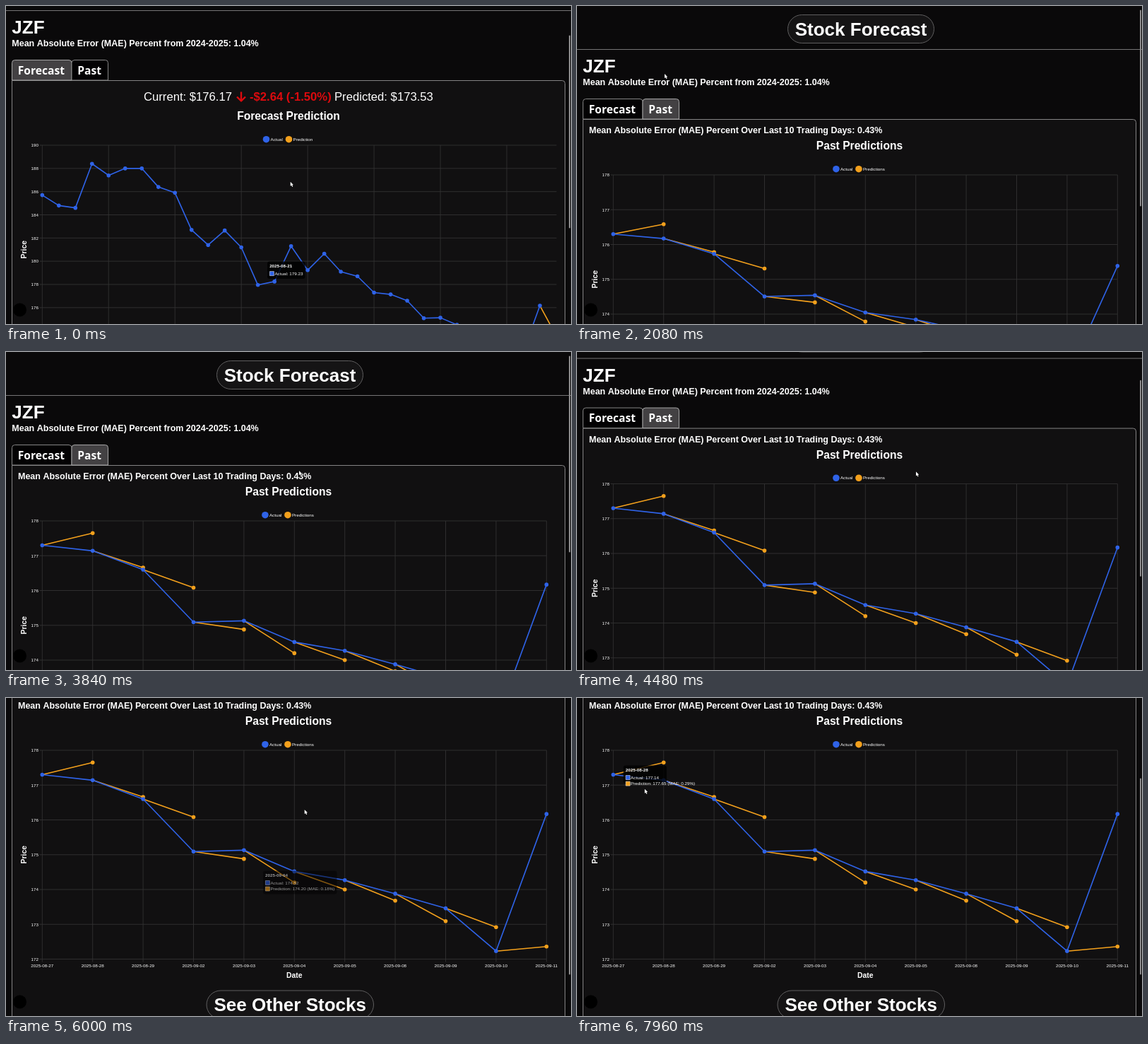
Animation of 800x450 px, one loop 8 s. Source, as an HTML page with a canvas:

```html
<!DOCTYPE html>
<html lang="en">
<head>
<meta charset="utf-8">
<title>Stock Forecast</title>
<style>
  html, body { margin: 0; width: 100%; height: 100%; overflow: hidden; background: #0a090a; }
  canvas { display: block; }
</style>
</head>
<body>
<canvas id="stage" width="800" height="450"></canvas>
<script>
const ctx = document.getElementById('stage').getContext('2d');
const LOOP = 8000, SWITCH = 1740;
const SCALE = 800 / 1536; // page pixels to stage pixels
const TINY = 12 * SCALE, HEADING = 24 * SCALE, TITLE = 30 * SCALE, LARGE = 32 * SCALE, HUGE = 50 * SCALE;
const LEFT = 51.3, PLOT = 295.5, FLOOR = 172; // plot edge, plot height, lowest price
const BLUE = '#2f63e8', ORANGE = '#f3a01c', RED = '#dc0a0e', WHITE = '#fff', RULE = '#333233';
const SANS = '"Liberation Sans", Arial, sans-serif', TAB_FONT = '"Noto Sans", sans-serif';

const prices = [185.7, 184.8, 184.6, 188.4, 187.4, 188, 188, 186.4, 185.9, 182.7, 181.4, 182.65, 181.2, 177.95,
  178.25, 181.3, 179.23, 180.65, 179.1, 178.7, 177.3, 177.14, 176.6, 175.09, 175.13, 174.52, 174.27, 173.88,
  173.46, 172.23, 176.17];
const guesses = [177.65, 176.66, 176.08, 174.88, 174.2, 174, 173.68, 173.09, 172.92, 172.36, 173.53];
const guessAt = i => guesses[i - 21];
const days = tradingDays(32);

const forecast = { title: 'Forecast Prediction', guessName: 'Prediction', top: 252, max: 190, step: 2,
  first: 0, last: 31, guessFrom: 31, dx: 23.49, gridEvery: 4 };
const past = { title: 'Past Predictions', guessName: 'Predictions', top: 239, max: 178, step: 1,
  first: 20, last: 30, guessFrom: 21, dx: 71.4, gridEvery: 1 };

// time, x, y of the pointer tip
const path = [[0, 403, 249], [920, 124, 96], [3240, 124, 96], [3840, 415, 168], [4240, 415, 168],
  [4600, 512, 170], [5880, 512, 170], [5960, 500, 168], [6000, 423, 158], [6880, 139, 131.5],
  [7300, 58, 128], [7880, 58, 128], [LOOP, 114, 129]];

const clamp = v => Math.max(0, Math.min(1, v));
const mix = (a, b, k) => a + (b - a) * k;
const outQuart = v => 1 - (1 - clamp(v)) ** 4;
const smooth = v => (v = clamp(v), v * v * (3 - 2 * v));
const chartX = (c, i) => LEFT + c.dx * (i - c.first);
const chartY = (c, v) => c.top + PLOT * (c.max - v) / (c.max - FLOOR);

function tradingDays(count) {
  const list = [];
  for (const d = new Date(Date.UTC(2025, 6, 30)); list.length < count; d.setUTCDate(d.getUTCDate() + 1)) {
    const day = d.toISOString().slice(0, 10);
    if (d.getUTCDay() % 6 && day !== '2025-09-01') list.push(day);
  }
  return list;
}

function pointerAt(t) {
  const n = Math.max(1, path.findIndex(p => p[0] > t));
  const [t0, x0, y0] = path[n - 1], [t1, x1, y1] = path[n];
  const k = clamp((t - t0) / (t1 - t0));
  return [mix(x0, x1, k), mix(y0, y1, k)];
}

function scrollAt(t) {
  if (t < SWITCH) return 55;
  return 55 * [4220, 4860, 5540].reduce((sum, s) => sum + smooth((t - s) / 300), 0);
}

// Follow the moving pointer over the plot and note when the nearest day changes.
function trackTips(c, from, to, tips) {
  for (let t = from; t < to; t += 5) {
    const [x, y] = pointerAt(t), pageY = y + scrollAt(t);
    const moved = x !== pointerAt(t - 5)[0];
    if (!moved || pageY < c.top || pageY > c.top + PLOT) continue;
    const index = c.first + Math.round(Math.max(0, x - LEFT) / c.dx);
    if (!tips.length || tips[tips.length - 1].index !== index) tips.push({ time: t, index });
    c.leave = t;
  }
  c.tips = tips;
}

function text(s, x, y, size, { bold = false, align = 'left', color = WHITE, font = SANS, middle = false } = {}) {
  ctx.font = `${bold ? 'bold ' : ''}${size}px ${font}`;
  ctx.textAlign = align;
  ctx.fillStyle = color;
  ctx.fillText(s, x, middle ? y + size * 0.36 : y);
}

function textWidth(s) {
  ctx.font = `${TINY}px ${SANS}`;
  return ctx.measureText(s).width;
}

function box(x, y, w, h, radii, fill, stroke, width = 1) {
  ctx.beginPath();
  ctx.roundRect(x, y, w, h, radii);
  ctx.fillStyle = fill;
  ctx.fill();
  if (!stroke) return;
  ctx.strokeStyle = stroke;
  ctx.lineWidth = width;
  ctx.stroke();
}

function dot(x, y, r, color) {
  ctx.beginPath();
  ctx.arc(x, y, r, 0, 7);
  ctx.fillStyle = color;
  ctx.fill();
}

function line(points, color, width) {
  ctx.beginPath();
  points.forEach(p => ctx.lineTo(...p));
  ctx.strokeStyle = color;
  ctx.lineWidth = width;
  ctx.stroke();
}

function drawGrid(c) {
  const bottom = c.top + PLOT;
  for (let i = c.first; i <= c.last; i += c.gridEvery) {
    const x = chartX(c, i);
    line([[x, c.top], [x, bottom + 4]], RULE, 0.9);
    text(days[i], x, bottom + 9, TINY, { align: 'center', middle: true });
  }
  for (let v = c.max; v >= FLOOR; v -= c.step) {
    const y = chartY(c, v);
    line([[LEFT - 4, y], [chartX(c, c.last), y]], RULE, 0.9);
    text(v, LEFT - 5.3, y, TINY, { align: 'right', middle: true });
  }
  const label = { bold: true, align: 'center' };
  text('Date', 408.3, bottom + 26.3, 20 * SCALE, label);
  ctx.save();
  ctx.translate(28.8, c.top + PLOT / 2);
  ctx.rotate(-Math.PI / 2);
  text('Price', 0, 0, 20 * SCALE, label);
  ctx.restore();
}

function drawSeries(c, grow) {
  const at = (i, v) => [chartX(c, i), mix(c.top + PLOT, chartY(c, v), grow)];
  for (let i = c.guessFrom; i <= c.last; i++) {
    const end = at(i, guessAt(i));
    line([at(i - 1, prices[i - 1]), end], ORANGE, 1.6);
    dot(...end, 2.8, ORANGE);
  }
  const points = prices.slice(c.first).map((v, n) => at(c.first + n, v));
  line(points, BLUE, 1.6);
  points.forEach(p => dot(...p, 2.8, BLUE));
}

function tipLines(c, i) {
  const price = prices[i], lines = [['Actual: ' + price.toFixed(2), BLUE]];
  if (i >= c.guessFrom) {
    const guess = guessAt(i), error = Math.abs(guess / price - 1) * 100;
    lines.push([`Prediction: ${guess.toFixed(2)} (MAE: ${error.toFixed(2)}%)`, ORANGE]);
  }
  return lines;
}

function tipRect(c, i) {
  const lines = tipLines(c, i), x = chartX(c, i), gap = 7 * SCALE;
  const w = Math.max(...lines.map(l => textWidth(l[0]))) + 13.5;
  const h = (30.4 + 16.4 * lines.length) * SCALE;
  const value = lines.length > 1 ? (2 * prices[i] + guessAt(i)) / 3 : prices[i];
  const onLeftHalf = x <= (LEFT + chartX(c, c.last)) / 2;
  return [onLeftHalf ? x + gap : x - gap - w, chartY(c, value) - h / 2, w, h];
}

function drawTip(c, t) {
  const alpha = clamp((t - c.tips[0].time) / 200) * (1 - clamp((t - c.leave) / 200));
  if (!alpha) return;
  const seen = c.tips.filter(tip => tip.time <= t);
  const [x, y, w, h] = seen.reduce((rect, { time, index }, n) => {
    const goal = tipRect(c, index), stop = n + 1 < seen.length ? seen[n + 1].time : t;
    return rect ? rect.map((v, j) => mix(v, goal[j], outQuart((stop - time) / 400))) : goal;
  }, null);
  const { index } = seen[seen.length - 1];
  ctx.globalAlpha = alpha;
  box(x, y, w, h, 3, 'rgba(0,0,0,.82)');
  text(days[index], x + 3.1, y + 6.6, TINY, { bold: true, middle: true });
  tipLines(c, index).forEach(([label, color], n) => {
    const cy = y + 17 + n * 8.6;
    box(x + 3.4, cy - 3, 6, 6, 0, color, WHITE, 0.5);
    text(label, x + 10.4, cy, TINY, { middle: true });
  });
  ctx.globalAlpha = 1;
}

function drawChart(c, t) {
  text(c.title, 400, c.top - 36, TITLE, { bold: true, align: 'center' });
  const legendX = 382.4 - textWidth(c.guessName) / 2;
  [['Actual', BLUE], [c.guessName, ORANGE]].forEach(([name, color], n) => {
    const x = legendX + 32 * n, y = c.top - 8.3;
    dot(x, y, 4.8, color);
    text(name, x + 6, y, TINY, { middle: true });
  });
  drawGrid(c);
  drawSeries(c, c === past ? outQuart((t - SWITCH) / 1000) : 1);
  drawTip(c, t);
}

function drawTab(label, x, w, active) {
  box(x, 131.5, w, 28.5, [4, 4, 0, 0], active ? '#434143' : '#030203', active ? '#a5a5a5' : '#858585');
  text(label, x + 8.3, 151.6, TITLE, { bold: true, font: TAB_FONT });
}

function drawPill(label, x, y, w, baseline) {
  box(x, y, w, 40, 20, '#151415', '#5f5e5f');
  text(label, x + w / 2, baseline, HUGE, { bold: true, align: 'center' });
}

function drawSummary() {
  const y = 189;
  text('Current: $176.17', 195, y, LARGE);
  line([[333, y - 12.5], [333, y]], RED, 2.4);
  line([[327, y - 5.5], [333, y + 0.5], [339, y - 5.5]], RED, 2.4);
  text('-$2.64 (-1.50%)', 345, y, LARGE, { bold: true, color: RED });
  text('Predicted: $173.53', 465, y, LARGE);
}

function drawPointer(t) {
  ctx.save();
  ctx.translate(...pointerAt(t));
  ctx.beginPath();
  [[0, 0], [0, 6.2], [1.4, 5], [2.6, 7.2], [3.6, 6.6], [2.6, 4.5], [4.4, 4.4]].forEach(p => ctx.lineTo(...p));
  ctx.closePath();
  ctx.strokeStyle = '#000';
  ctx.lineWidth = 1;
  ctx.stroke();
  ctx.fillStyle = WHITE;
  ctx.fill();
  ctx.restore();
}

function draw(t) {
  const onPast = t >= SWITCH, scroll = scrollAt(t), bold = { bold: true };
  ctx.fillStyle = '#0a090a';
  ctx.fillRect(0, 0, 800, 450);
  ctx.save();
  ctx.translate(0, -scroll);
  drawPill('Stock Forecast', 298.5, 12.5, 207, 42.3);
  line([[0, 61.5], [800, 61.5]], '#757475', 1);
  text('JZF', 8.3, 94.2, HUGE, bold);
  text('Mean Absolute Error (MAE) Percent from 2024-2025: 1.04%', 8.3, 112, HEADING, bold);
  box(8.5, 160.5, 783, 520, [0, 4, 4, 4], '#111011', '#848384');
  drawTab('Forecast', 8.5, 84.5, !onPast);
  drawTab('Past', 93, 51.5, onPast);
  if (onPast) text('Mean Absolute Error (MAE) Percent Over Last 10 Trading Days: 0.43%', 17, 180.3, HEADING, bold);
  else drawSummary();
  drawPill('See Other Stocks', 284, 579, 236.5, 607.6);
  drawChart(onPast ? past : forecast, t);
  ctx.restore();

  box(797, 5.5 + scroll * 0.655, 2, onPast ? 278 : 273, 1, '#8b8a8b');
  dot(19.5, 430, 9.5, '#000');
  drawPointer(t);
}

function tick(now) {
  draw(now % LOOP);
  requestAnimationFrame(tick);
}

trackTips(forecast, 0, SWITCH, [{ time: -1000, index: 16 }]);
trackTips(past, SWITCH, LOOP, []);
ctx.lineJoin = 'round';
requestAnimationFrame(tick);
</script>
</body>
</html>
```
